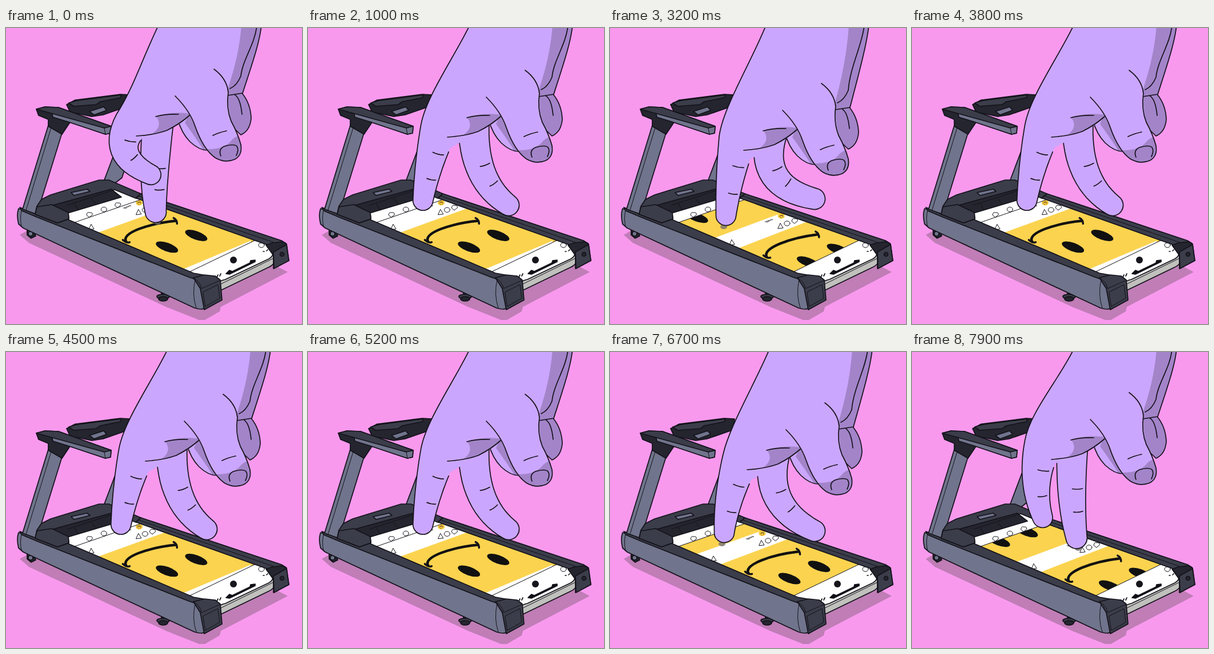
Write an HTML page that moves like this. It is 518 px wide and 518 px high and loops after 8000 ms.

```html
<!DOCTYPE html>
<html lang="en">
<head>
<meta charset="utf-8">
<title>Finger treadmill</title>
<style>
  html, body { margin: 0; width: 100%; height: 100%; overflow: hidden; background: #f899ee; }
  svg { display: block; width: 100vw; height: 100vh; }
  .ink { stroke: #14121a; stroke-width: 1.7; stroke-linejoin: round; stroke-linecap: round; }
  .line { fill: none; }
  .steel { fill: #70748c; }
  .dark { fill: #3b3d4a; }
  .black { fill: #24252e; }
  .skin { fill: #cba6fe; }
  .shade { fill: #a384c9; }
  .thin { stroke-width: 1; }
  .tick { stroke-width: 3.5; }
  text { font: 700 7px Inter, sans-serif; fill: #1b1920; }
</style>
</head>
<body>
<svg viewBox="0 0 518 518">
  <defs><clipPath id="glass"><path d="M90 326 195 276 463 379 467 400 374 446 328 432 105 345Z"/></clipPath></defs>
  <rect width="518" height="518" fill="#f899ee"/>
  <path fill="#c07db6" d="M24 362 42 352 280 440 470 415 493 427 376 488 374 496 348 511 338 511 280 488 40 376Z"/>

  <g class="ink">
    <path class="black" d="M37 350 49 354 52 364 44 368 37 362Z"/>
    <circle class="steel" cx="43" cy="360" r="4"/>
    <path class="black" d="M272 456H280V470H272Z"/>
    <ellipse class="dark" cx="275" cy="470" rx="11" ry="4"/>
    <ellipse class="black" cx="275" cy="474" rx="8" ry="4"/>
    <path class="steel" d="M228 140 240 145 203 262 190 272 172 266 195 205Z"/>
    <path class="black" d="M106 134 121 126 200 116 218 117 216 136 170 152 150 155 112 147Z"/>
    <path class="dark" d="M110 131 124 127 202 117 200 122 165 129 158 134 118 137Z"/>
    <path class="steel" d="M146 146 171 138 176 144 154 152Z"/>
  </g>

  <g id="screen" clip-path="url(#glass)"></g>

  <g class="ink">
    <path fill="#c0c0bd" d="M372 445 Q376 442 384 440L460 404 Q467 400 467 394L469 411 Q466 416 459 419L376 459Z"/>
    <path class="line thin" d="M374 449 468 403"/>
    <path fill="#101014" d="M385 430 391 424 396 426 427 411 428 407 436 406 436 409 391 431Z"/>
    <path class="dark" d="M222 292 236 290 482 372 490 377 459 383 456 379 228 298Z"/>
    <path class="line thin" d="M229 293 468 375"/>
    <path class="black" d="M455 380 466 376 484 374 491 378 495 407 468 421 468 398Z"/>
    <path class="dark" d="M468 392 491 379 495 407 469 421Z"/>
    <circle class="black" cx="483" cy="396" r="3.5"/>

    <path class="steel" d="M22 316 Q18 327 22 343L30 350 330 490 Q344 494 347 490L338 440 60 328Z"/>
    <path class="dark" d="M24 314 33 317 57 328 90 341 108 335 328 429 345 432 335 441 320 436 54 331 28 320Z"/>
    <path class="line thin" d="M27 320 Q24 333 27 347M331 440 Q325 467 333 490"/>
    <path class="dark" d="M328 437 347 432 366 434 375 441 378 476 347 493 340 456Z"/>
    <path class="line thin" d="M328 437 Q341 445 342 456L374 442M345 462 371 449 374 473 349 487Z"/>

    <path class="steel" d="M76 164 101 174 54 326 29 317Z"/>
    <path class="line thin" d="M81 168 35 319"/>
    <path class="dark" d="M62 300 78 292 163 266 180 266 236 290 227 298 190 283 108 310 110 334 90 341 51 326 54 312Z"/>
    <path class="black" d="M79 311 184 282 202 296 108 324Z"/>
    <path class="dark" d="M54 313 80 309 109 323 110 334 90 341 51 326Z"/>
    <path class="line thin" d="M108 310 187 284M120 308 126 318M150 299 158 308"/>
    <path class="steel" d="M114 288 142 282 147 286 119 293Z"/>

    <path class="black" d="M53 142 68 138 92 139 184 172 183 184 174 186 112 165 98 186 74 172 74 160 57 153Z"/>
    <path class="steel" d="M80 146 92 140 184 172 183 184 174 186 108 164 82 156Z"/>
    <path class="dark" d="M53 142 68 138 92 139 184 172 172 175 82 150Z"/>
    <path class="line thin" d="M172 175 174 186"/>
  </g>
  <g id="hand" class="ink"></g>
</svg>

<script>
const LOOP = 8000, TICK = 100, STEPS = 12;
// Time (ms) and walk phase; the stride is faster in the opening seconds.
const PACE = [[0, -30], [1900, 5], [3200, 26], [4500, 48], [5900, 71], [6700, 85], [7900, 104]];
// phase, body shift, then base / joint / tip of the index and middle fingers
const POSES = [
  [-1, 16, -11, 230, 170, 215, 225, 206, 285, 292, 155, 304, 240, 342, 308],
  [0, 16, 2, 228, 180, 212, 240, 201, 303, 290, 165, 304, 252, 351, 310],
  [1, 12, 17, 228, 190, 209, 255, 200, 316, 289, 172, 294, 256, 358, 313],
  [2, 6, 25, 222, 200, 210, 265, 203, 328, 284, 180, 288, 258, 358, 299],
  [5, -13, 40, 215, 195, 213, 270, 236, 350, 262, 185, 262, 260, 304, 285],
  [6, 0, 0, 225, 160, 208, 215, 254, 257, 266, 165, 260, 255, 262, 322],
  [8, 16, -1, 228, 165, 218, 230, 229, 291, 281, 160, 280, 250, 288, 326]
];
POSES.push([11, ...POSES[0].slice(1)]);

const screen = document.getElementById('screen');
const hand = document.getElementById('hand');
const mod = (a, n) => ((a % n) + n) % n;
const pt = p => p[0].toFixed(1) + ' ' + p[1].toFixed(1);
const add = (p, x, y) => [p[0] + x, p[1] + y];
const mix = (a, b, k) => a.map((v, i) => v + (b[i] - v) * k);

function lerpRow(rows, x) {
  let i = 1;
  while (i < rows.length - 1 && rows[i][0] < x) i++;
  const a = rows[i - 1], b = rows[i];
  return mix(a, b, (x - a[0]) / (b[0] - a[0]));
}

// Screen plane: u runs from the far end to the near end, v from left to right.
const P = (u, v) => pt([107 + 225 * u + v * (115 + 11 * u), 336 + 96 * u - v * (39 + 15 * u)]);
const band = (u0, u1, fill) =>
  `<path fill="${fill}" d="M${P(u0, -.1)}L${P(u0, 1.1)} ${P(u1, 1.1)} ${P(u1, -.1)}Z"/>`;
const at = (u, v, inner) => `<g transform="translate(${P(u, v)})">${inner}</g>`;

const SEND = '<path class="ink line thin" d="M-4 4 0-5 5 3Z"/>';
const BUBBLE = '<ellipse class="ink line thin" rx="5" ry="4.2"/>';
const HEART = '<path class="ink line thin" d="M-5 1Q-4-5 0-3 6-4 5 1L0 5Z"/>';
const EYE = '<ellipse rx="20.5" ry="7.5" transform="rotate(20)" fill="#111"/>';
const AVATAR = '<ellipse rx="6" ry="5" fill="#f9c93d"/><path class="ink line thin" d="M-3 1Q0-3 3 0M-1 3h.1M2 2h.1"/>';

function post(b) {
  return band(b + .235, b + .9, '#fbd34f') +
    at(b + .63, .27, EYE) + at(b + .63, .69, EYE) +
    `<path fill="none" stroke="#111" stroke-width="4.4" stroke-linecap="round"
      d="M${P(b + .425, .065)}C${P(b + .32, .18)} ${P(b + .33, .58)} ${P(b + .405, .83)}"/>` +
    at(b + .425, .065, '<path class="ink line tick" d="M-6-3Q1 3 6 1"/>') +
    at(b + .405, .83, '<path class="ink line tick" d="M-4-5Q2-2 2 5"/>') +
    at(b + .076, .94, AVATAR) +
    at(b + .085, .73, '<text transform="matrix(-.9 .36 -.8 -.35 6 -5)">nolli</text>') +
    at(b + .175, .73, SEND) + at(b + .175, .83, BUBBLE) + at(b + .175, .94, HEART) +
    at(b + .155, .06, SEND);
}

function drawScreen(phase) {
  const shift = (mod(phase + 1, 6) - 1) * .142;
  let out = '<rect x="80" y="260" width="400" height="220" fill="#fff"/>';
  for (let k = -2; k < 2; k++) out += post(shift + k * .852);
  out += band(-.4, .05, '#fff') + at(.02, .3, HEART) + at(.02, .52, BUBBLE) + at(.02, .73, HEART);
  out += `<path class="ink line thin" d="M${P(.05, 0)}L${P(.05, 1)}"/>
    <path class="ink thin" fill="#fff" d="M${P(.95, -.05)}L${P(.91, 1.05)} 480 365 480 415 370 460Z"/>
    <circle cx="398" cy="406" r="6" fill="#17151c"/>
    <g transform="translate(447 380)">${BUBBLE}</g>
    <path class="ink line" d="M369 436l2-4M374 434l2-4M450 391h2M456 390l2-2"/>`;
  screen.innerHTML = out;
}

// Tapered limb through three joints, sampled as a left and a right side.
function limb(base, joint, tip, radii) {
  const ctl = joint.map((v, i) => 2 * v - (base[i] + tip[i]) / 2);
  const left = [], right = [];
  for (let n = 0; n <= 16; n++) {
    const t = n / 16, s = 1 - t;
    const pos = i => s * s * base[i] + 2 * s * t * ctl[i] + t * t * tip[i];
    const vel = i => 2 * s * (ctl[i] - base[i]) + 2 * t * (tip[i] - ctl[i]);
    const r = radii[0] * s * s + (4 * radii[1] - radii[0] - radii[2]) * s * t + radii[2] * t * t;
    const len = Math.hypot(vel(0), vel(1)), nx = vel(1) / len * r, ny = -vel(0) / len * r;
    left.push([pos(0) - nx, pos(1) - ny]);
    right.push([pos(0) + nx, pos(1) + ny]);
  }
  const r = radii[2];
  const outline = (from = 0) => 'L' + left.map(pt).join(' ') +
    `A${r} ${r} 0 0 0 ${pt(right[16])}L` + right.slice(from, 16).reverse().map(pt).join(' ');
  const crease = n => {
    const a = right[n], b = left[n];
    return `M${pt(mix(a, b, .12))}Q${pt(add(mix(a, b, .3), 0, 2))} ${pt(mix(a, b, .48))}`;
  };
  return { left, right, outline, crease };
}

function drawHand(phase) {
  const step = mod(phase, STEPS);
  const [, dx, dy, ...j] = lerpRow(POSES, mod(phase + 1, STEPS) - 1);
  const joint = n => [j[2 * n], j[2 * n + 1]];
  const index = limb(joint(0), joint(1), joint(2), [32, 24, 17.5]);
  const middle = limb(joint(3), joint(4), joint(5), [27, 24, 18.5]);
  // The arm follows the hand sideways but stays attached above the stage.
  const arm = (x, y, follow = 0) => pt([x + dx, y + dy * follow]);
  const palm = (x, y) => arm(x, y, 1);

  const [k0, k1] = index.left;
  const reach = 50 / Math.hypot(k1[0] - k0[0], k1[1] - k0[1]);
  const lead = mix(k0, k1, -reach);
  const edge = `M${arm(267, -5)}C${arm(240, 50, .5)} ${pt(lead)} ${pt(k0)}`;
  const spot = step > 0 && step < 6 ? add(joint(2), -4, 20)
    : step >= 6 && step < 10 ? add(joint(5), 3, 18) : null;
  const body = `translate(${dx} ${dy})`;

  hand.innerHTML =
    (spot ? `<ellipse cx="${spot[0]}" cy="${spot[1]}" rx="6" ry="4" fill="#77736d" stroke="none" opacity=".8"/>` : '') +
    `<path class="skin" d="M${pt(middle.left[0])}${middle.outline()}"/>
    <path class="line" d="${middle.crease(7)}${middle.crease(11)}"/>
    <g transform="${body}">
      <path class="shade" d="M386 118Q398 104 413 114 428 132 429 158 427 180 411 187L388 165Z"/>
      <path class="line" d="M399 116Q410 121 413 151"/>
      <path class="skin" d="M300 158Q307 184 322 199 338 214 353 214L362 190 325 145Z"/>
      <path class="shade" stroke="none" d="M320 150Q340 190 358 215L345 212Q327 185 313 166Z"/>
    </g>
    <path class="shade" d="M${arm(412, -5)}L${arm(447, -5)}C${arm(444, 25)} ${arm(431, 62, .5)} ${palm(414, 114)}
      L${palm(388, 118)} ${palm(370, 70)}Z"/>
    <path class="skin" stroke="none" d="${edge}${index.outline()}L${pt(index.right[3])}Q${palm(276, 185)} ${palm(322, 153)}
      L${palm(386, 112)}C${arm(396, 84, .7)} ${arm(408, 45, .4)} ${arm(412, -5)}Z"/>
    <g transform="${body}">
      <path class="shade" stroke="none" d="M263 155Q290 145 323 150 301 178 256 185 275 172 263 155Z"/>
      <path class="line" d="M228 189Q260 187 282 179 304 168 321 153M262 155Q280 150 302 151"/>
    </g>
    <path class="line" d="${edge}${index.outline(4)}"/>
    <path class="line" d="${index.crease(5)}${index.crease(11)}
      M${arm(439, -5)}C${arm(436, 28)} ${arm(414, 55, .5)} ${palm(411, 84)}Q${palm(404, 101)} ${palm(392, 106)}"/>
    <g transform="${body}">
      <path class="skin" stroke="none" d="M296 119Q322 145 331 172 345 212 366 227 383 237 400 230 414 223 411 204 405 183 394 163 388 138 388 112L364 72Z"/>
      <path class="shade" stroke="none" d="M350 212Q383 213 396 195 405 188 407 190 414 206 409 222 400 235 379 233 362 227 350 212Z"/>
      <path class="line" d="M296 119Q322 145 331 172 345 212 366 227 383 237 400 230 414 223 411 204 405 183 394 163 385 140 389 112 386 88 364 72"/>
      <path class="line" d="M376 224Q371 212 382 207 399 202 404 207 408 213 403 223M362 188Q372 183 386 180"/>
    </g>`;
}

let shown = null;
function draw(elapsed) {
  const time = Math.floor(mod(elapsed, LOOP) / TICK) * TICK;
  const phase = Math.round(lerpRow(PACE, time)[1]);
  if (phase === shown) return;
  shown = phase;
  drawScreen(phase);
  drawHand(phase);
}

const start = performance.now();
function loop() {
  draw(performance.now() - start);
  requestAnimationFrame(loop);
}
loop();
</script>
</body>
</html>
```
